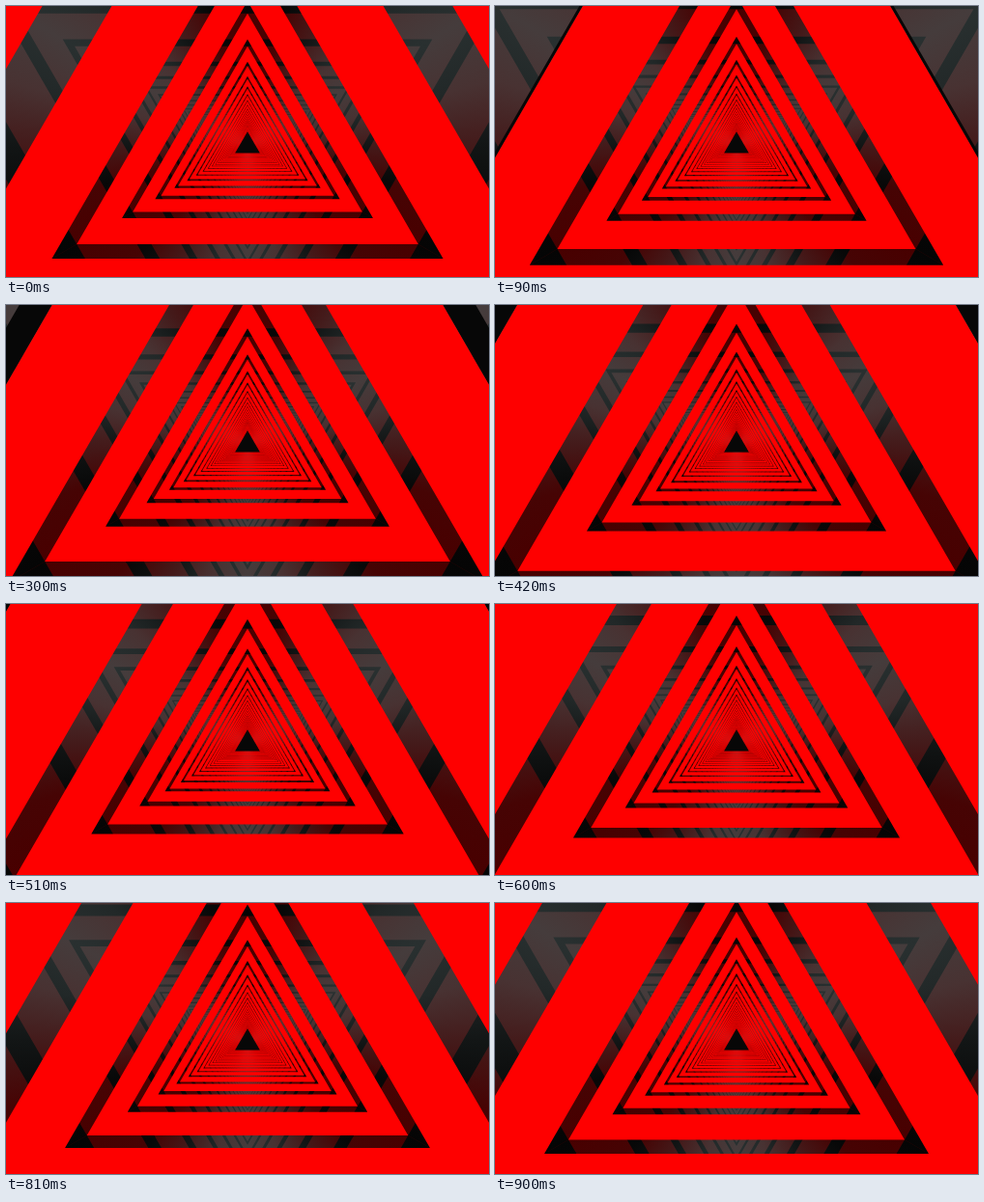
Animation, 500 px wide and 281 px high, one loop 930 ms. Source, as an HTML page with a canvas:

```html
<!DOCTYPE html>
<html lang="en">
<head>
<meta charset="utf-8">
<title>Triangle tunnel</title>
<style>
  html, body { margin: 0; width: 100%; height: 100%; overflow: hidden; background: #000; }
  canvas { display: block; width: 500px; height: 281px; }
</style>
</head>
<body>
<canvas id="stage" width="500" height="281"></canvas>
<script>
const ctx = document.getElementById('stage').getContext('2d');
const CX = 250, CY = 145, S3 = Math.sqrt(3), TAU = Math.PI * 2;
const LOOP = 930, STEP = 30;

// Depths are inverse inradii, so they move linearly.
const PITCH = 0.00478, NEAR = 0.00502, FAR = 0.00855, SPEED = PITCH / 0.93;
const COUNT = 29, END_RADIUS = 7.4;
const RED = '#fe0000', BLACK = '#070707';

// Depths close to the camera are held back slightly.
function radius(depth) {
  const close = Math.min(Math.max((0.0065 - depth) / 0.0015, 0), 1);
  return 1 / Math.max(depth + 0.00013 * close, 0.0005);
}

// The closest front edge slows down as it leaves the view.
const edgeRadius = depth =>
  depth < NEAR ? radius(NEAR) + 178 * (NEAR - depth) / SPEED : radius(depth);

// Three-fold angular shading from the middle of a wall to its corners.
function shade(...colors) {
  const gradient = ctx.createConicGradient(Math.PI / 2, 0, 0);
  const last = colors.length - 1;
  for (let side = 0; side <= 3; side++) {
    colors.forEach((color, i) => {
      const offset = i / last / 6;
      for (const at of [side / 3 - offset, side / 3 + offset]) {
        if (at >= 0 && at <= 1) gradient.addColorStop(at, color);
      }
    });
  }
  return gradient;
}
const wall = shade('#453c3c', '#483232', '#441a1a', '#460404', '#480000');
const dark = shade('#293030', '#222828', '#121515', '#080808', '#050505');

// Far slots melt into the red.
const glow = ctx.createRadialGradient(0, 0, 6, 0, 0, 60);
glow.addColorStop(0, 'rgba(254,0,0,0.5)');
glow.addColorStop(0.4, 'rgba(254,0,0,0.3)');
glow.addColorStop(1, 'rgba(254,0,0,0)');

function triangle(r) {
  ctx.moveTo(0, -2 * r);
  ctx.lineTo(S3 * r, r);
  ctx.lineTo(-S3 * r, r);
  ctx.closePath();
}

function ring(outer, inner, color) {
  ctx.fillStyle = color;
  ctx.beginPath();
  triangle(outer);
  triangle(inner);
  ctx.fill('evenodd');
}

// A slot seen on the far walls of the mirrored neighbour tunnel.
function slot(outer, inner) {
  ctx.beginPath();
  ctx.moveTo(-S3 * outer, outer);
  ctx.lineTo(0, 4 * outer);
  ctx.lineTo(S3 * outer, outer);
  ctx.lineTo(S3 * inner, inner);
  ctx.lineTo(0, 4 * inner);
  ctx.lineTo(-S3 * inner, inner);
  ctx.closePath();
  ctx.fill();
}

function fillStage(style) {
  ctx.fillStyle = style;
  ctx.fillRect(-CX, -CY, 500, 281);
}

function draw(phase) {
  const shift = k => PITCH * (k - 1 - phase);
  ctx.setTransform(1, 0, 0, 1, CX, CY);
  fillStage(wall);

  ctx.fillStyle = dark;
  for (let side = 0; side < 3; side++) {
    for (let k = -1; k < COUNT; k++) {
      slot(radius(FAR + shift(k)), radius(NEAR + shift(k + 1)));
    }
    ctx.rotate(TAU / 3);
  }

  for (let k = 0; k < COUNT; k++) {
    const front = NEAR + shift(k), back = FAR + shift(k);
    if (back < 0.003) continue;
    const edge = edgeRadius(front);
    if (front < NEAR) ring(radius(front), edge, BLACK);
    ring(edge, radius(back), RED);
  }

  fillStage(glow);
  ctx.fillStyle = BLACK;
  ctx.beginPath();
  triangle(END_RADIUS);
  ctx.fill();
}

const start = performance.now();
function tick() {
  const t = (performance.now() - start) % LOOP;
  draw(Math.floor(t / STEP) * STEP / LOOP);
  requestAnimationFrame(tick);
}
tick();
</script>
</body>
</html>
```
